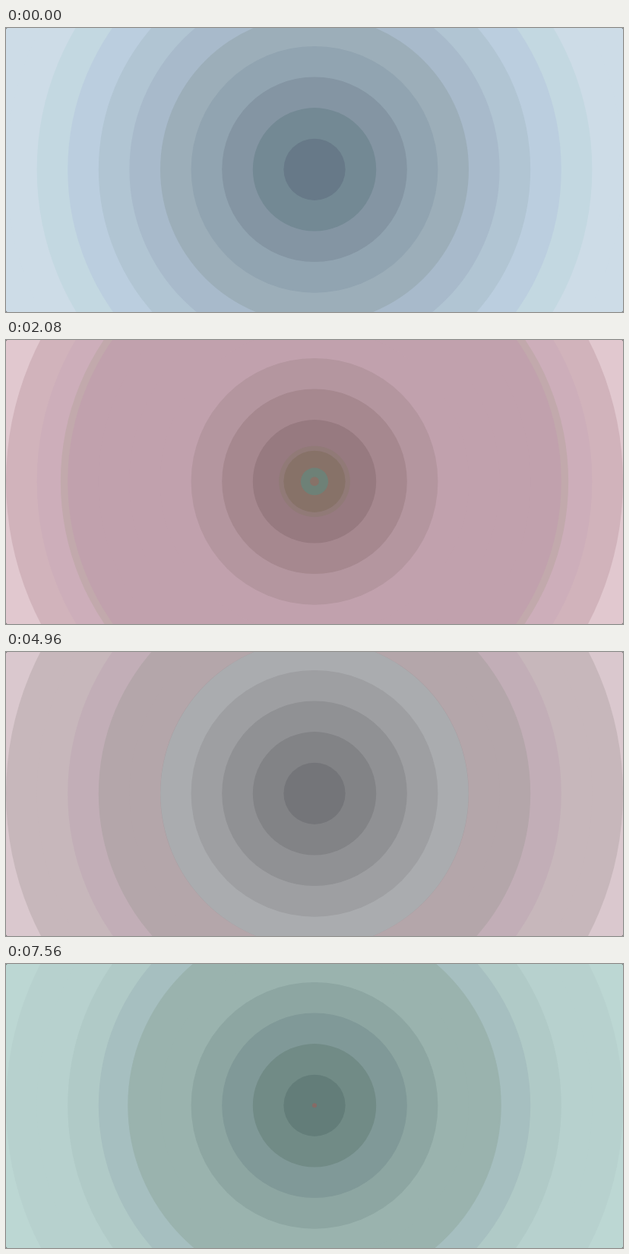
Animation of 812x374 px, one loop 7.6 s. Source, as an HTML page with a canvas:

```html
<!DOCTYPE html>
<html lang="en">
<head>
<meta charset="utf-8">
<title>Ripples</title>
<style>
  html, body { margin: 0; width: 100%; height: 100%; overflow: hidden; background: #555; }
  canvas { display: block; width: 812px; height: 374px; border-radius: 2px; }
</style>
</head>
<body>
<canvas id="stage" width="812" height="374"></canvas>
<script>
const LOOP = 7600, TICK = 40;
const CX = 406, CY = 186.3, STEP = 40.6, RINGS = 11;
const GROW = 950, REACH = 470;

const parse = hex => [0, 2, 4].map(i => parseInt(hex.slice(i, i + 2), 16));
const mix = (a, b, k) => a.map((v, i) => v + (b[i] - v) * k);
const clamp = v => Math.min(1, Math.max(0, v));

// "ring:colour" stops, from the centre outwards; gaps are interpolated.
function palette(spec) {
  const stops = spec.split(' ').map(s => {
    const [ring, hex] = s.split(':');
    return { ring: +ring, rgb: parse(hex) };
  });
  return Array.from({ length: RINGS }, (_, ring) => {
    const next = stops.findIndex(s => s.ring >= ring);
    if (next < 0) return stops[stops.length - 1].rgb;
    if (next === 0) return stops[0].rgb;
    const a = stops[next - 1], b = stops[next];
    return mix(a.rgb, b.rgb, (ring - a.ring) / (b.ring - a.ring));
  });
}

const blue = palette('0:677988 1:738994 2:8495a3 3:91a4b1 4:9caeb9 5:a8bacb 6:b1c5d3 7:bbcedf 8:c3d8e1 9:cddce7');
const haze = palette('0:75757f 4:aba9b3 5:b6b4bf 6:c5c2ce 7:cec8cf 8:d2d2d2 9:d8d8d8');
const clay = palette('0:85736c 3:ad9a93 4:b9a49f 10:dcc8c6');
const rose = palette('0:876d74 1:96797e 2:a4878b 3:b2949c 4:c1a1ad 8:cdaeba 9:d1b3bb 10:e1c8cf');
const mauve = palette('0:876d74 1:977a80 2:a6888f 3:b4969f 4:c1a1ad 7:c1a1ad 8:c2a9ac 10:d0c0c0');
const silver = palette('0:777678 4:a8a6a8 9:cbcbcb 10:cccccc');
const steel = palette('0:777578 4:a4a2a5 7:b1b1b1 9:b1b1b1 10:c4c4c4');
const lilac = palette('0:7e6e80 3:a999ab 4:b5a5b6 6:b5a5b6 7:c49eab 10:d4bac4');
const plum = palette('0:7e6e80 1:8c7b8e 2:9b8a9c 3:a999ab 4:a999ab 10:d0c2cc');
const blush = palette('0:79696e 4:a8999d 5:b4a6aa 6:b4a6aa 7:c2aeb7 8:c7b7bb 9:c7b7bb 10:dac8ce');
const slate = palette('0:747579 1:828386 2:909194 3:9e9fa2 4:aaacaf 10:d6d2d3');
const salmon = palette('0:84706c 4:c5a09b 5:ceaeab 6:d6babb 7:dac5c4 8:dfccca 9:e6d3d1');
const sage = palette('0:777670 1:84827d 2:929089 3:9ca098 4:a8aea8 10:ccd6d0');
const mint = palette('0:667c78 4:98b1b0 6:a6bfc0 7:b0cac7 8:b7d1ce 9:b7d1ce 10:bcd7d3');
const jade = palette('0:637d79 1:718b86 2:809998 3:8da6a2 4:9ab3ae 6:9ab3ae 10:bcd7d3');

const olive = palette('0:877268 1:917a77 10:d0c0bc');
const umber = palette('0:7f7372 1:8b7d7b 10:ccc0c2');
const teal = palette('0:6e8177 10:b8ccc4');
const rust = palette('0:866b66 10:d0b4ae');

// start time, body colours, colours while still small
const waves = [
  [120, haze], [529, clay], [611, rose],
  [939, rose, olive], [1013, rose, teal], [1279, mauve],
  [1780, rose, olive], [1894, silver, teal], [1973, silver, olive],
  [2700, silver], [3107, steel], [3177, lilac], [3377, plum],
  [3660, blush, umber], [3836, blush, teal],
  [4336, slate], [5000, salmon], [5609, sage],
  [6112, mint, rust], [6873, jade], [7484, mint, rust]
];

const ctx = document.getElementById('stage').getContext('2d');

function disc(radius, rgb) {
  ctx.fillStyle = `rgb(${rgb.map(Math.round).join(',')})`;
  ctx.beginPath();
  ctx.arc(CX, CY, radius, 0, Math.PI * 2);
  ctx.fill();
}

function target(radius, body, core = body) {
  const k = clamp((radius - 50) / 80);
  for (let ring = RINGS - 1; ring >= 0; ring--) {
    if (ring * STEP >= radius) continue;
    const edge = ring === RINGS - 1 ? REACH : (ring + 1) * STEP;
    disc(Math.min(radius, edge), mix(core[ring], body[ring], k));
  }
}

function draw(t) {
  target(REACH, blue);
  for (const [start, body, core] of waves) {
    if (t <= start) continue;
    const u = clamp((t - start) / GROW);
    target(REACH * u * u, body, core);
  }
}

const begin = performance.now();
function frame() {
  const t = (performance.now() - begin) % LOOP;
  draw(Math.floor(t / TICK) * TICK);
  requestAnimationFrame(frame);
}
frame();
</script>
</body>
</html>
```
